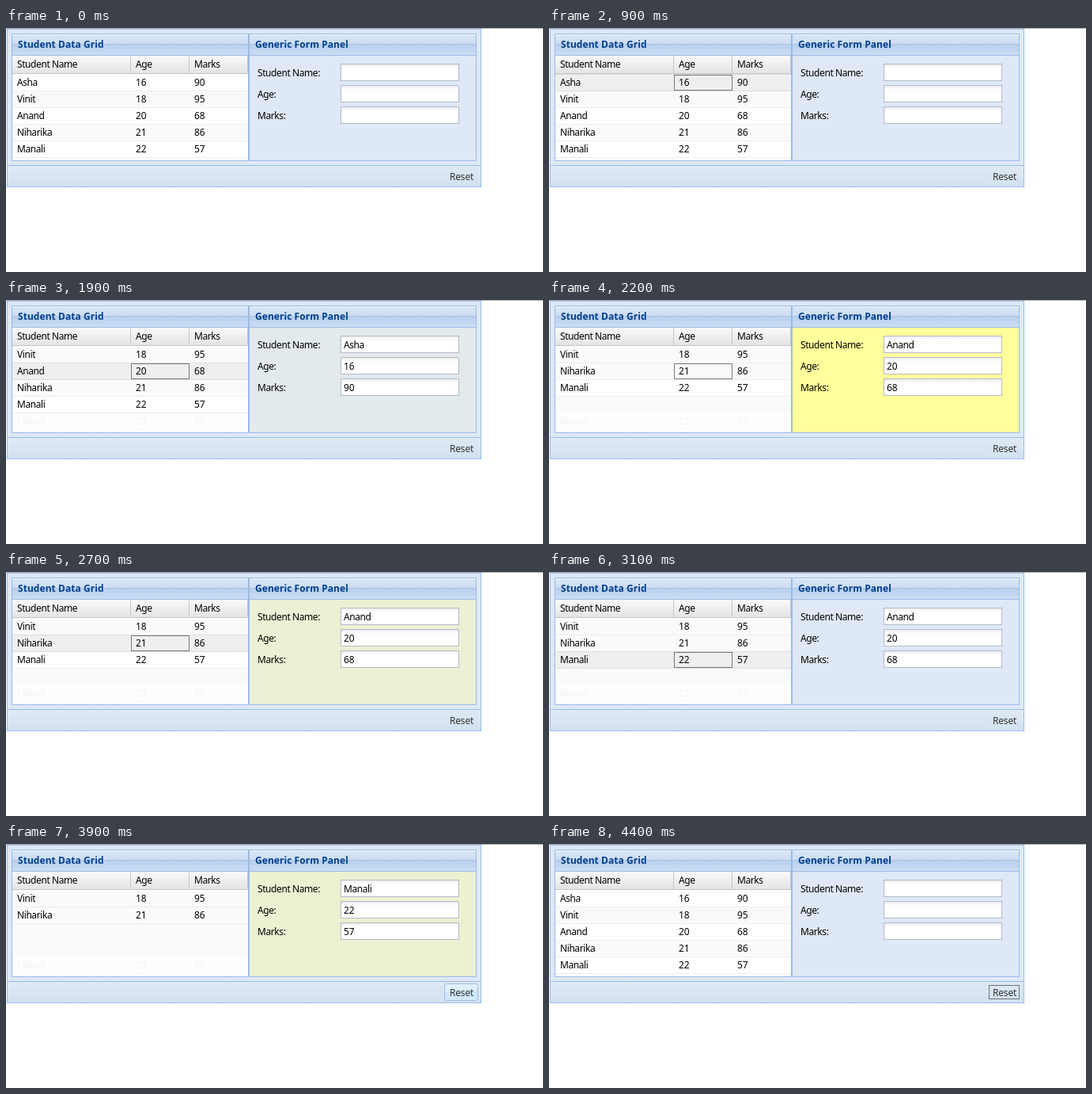
Animation of 679x308 px, one loop 4.9 s. Source, as an HTML page:

```html
<!DOCTYPE html>
<html lang="en">
<head>
<meta charset="utf-8">
<title>Grid to form drag and drop</title>
<style>
html, body { margin: 0; width: 100%; height: 100%; overflow: hidden; background: #fff; }
svg { display: block; width: 679px; height: 308px; }
text { font: 12px "Noto Sans", "Open Sans", sans-serif; letter-spacing: -.42px; fill: #000; white-space: pre; }
text.num { letter-spacing: 0; }
text.title { font-weight: 700; letter-spacing: .05px; fill: #04408c; }
</style>
</head>
<body>
<svg id="stage" viewBox="0 0 679 308" xmlns="http://www.w3.org/2000/svg">
  <defs>
    <linearGradient id="head" x2="0" y2="1">
      <stop stop-color="#dae7f6"/><stop offset=".45" stop-color="#cddef3"/>
      <stop offset=".46" stop-color="#abc7ec"/><stop offset=".5" stop-color="#abc7ec"/>
      <stop offset=".51" stop-color="#b8cfee"/><stop offset="1" stop-color="#cbddf3"/>
    </linearGradient>
    <linearGradient id="cols" x2="0" y2="1">
      <stop stop-color="#f9f9f9"/><stop offset="1" stop-color="#e3e4e6"/>
    </linearGradient>
    <linearGradient id="bar" x2="0" y2="1">
      <stop stop-color="#dfe9f5"/><stop offset="1" stop-color="#d3e1f1"/>
    </linearGradient>
    <linearGradient id="field" x2="0" y2="1">
      <stop stop-color="#ececec"/><stop offset=".25" stop-color="#fff"/>
    </linearGradient>
    <linearGradient id="button" x2="0" y2="1">
      <stop stop-color="#e4f3ff"/><stop offset=".5" stop-color="#d9edff"/>
      <stop offset=".51" stop-color="#c9e6ff"/><stop offset="1" stop-color="#d5ebff"/>
    </linearGradient>
  </defs>
  <g id="base"></g>
  <g id="live"></g>
</svg>
<script>
const LOOP = 4900;
const BORDER = '#99bce8';
const students = [
  ['Asha', 16, 90], ['Vinit', 18, 95], ['Anand', 20, 68], ['Niharika', 21, 86], ['Manali', 22, 57]
];
const columns = [14, 164, 238];
const labels = ['Student Name', 'Age', 'Marks'];

// Each step changes part of the state; fade runs from yellow (0) to the panel colour (1).
const steps = [
  [0, { rows: [0, 1, 2, 3, 4], hover: -1, focus: -1, record: -1, fade: 1, proxy: null, button: 0, used: false }],
  [400, { hover: 1 }],
  [500, { hover: 0 }],
  [900, { focus: 0 }],
  [1000, { proxy: [190, 80] }],
  [1100, { proxy: [262, 92], hover: -1 }],
  [1200, { proxy: [345, 102], fade: 0 }],
  [1300, { proxy: [410, 104], fade: .08 }],
  [1500, { proxy: null, rows: [1, 2, 3, 4], record: 0, fade: .28, hover: 2, used: true }],
  [1700, { fade: .6, hover: 1 }],
  [1800, { fade: .75 }],
  [1900, { fade: .9, focus: 1 }],
  [2000, { fade: 1, proxy: [200, 98] }],
  [2100, { fade: 0, proxy: [299, 104], hover: -1 }],
  [2200, { proxy: null, rows: [1, 3, 4], record: 2 }],
  [2500, { fade: .32 }],
  [2700, { fade: .62, hover: 1 }],
  [2800, { fade: .75, hover: 2 }],
  [2900, { fade: .88 }],
  [3100, { fade: 1, focus: 2 }],
  [3200, { proxy: [220, 110], hover: -1 }],
  [3300, { proxy: [410, 104], fade: 0 }],
  [3400, { proxy: null, rows: [1, 3], focus: -1, record: 4 }],
  [3700, { fade: .35 }],
  [3900, { fade: .6, button: 1 }],
  [4100, { fade: .85, rows: [0, 1, 2, 3, 4], record: -1, button: 2, used: false }],
  [4200, { fade: 1 }],
  [4400, { button: 3 }]
];

const rect = (x, y, w, h, fill, extra = '') =>
  `<rect x="${x}" y="${y}" width="${w}" height="${h}" fill="${fill}" ${extra}/>`;
const frame = (x, y, w, h, fill, stroke, extra = '') =>
  rect(x + .5, y + .5, w - 1, h - 1, fill, `stroke="${stroke}" ${extra}`);
const dotted = (x, y, w, h) => frame(x, y, w, h, 'none', '#000', 'stroke-dasharray="1 1"');
const text = (x, y, value, extra = '') =>
  `<text x="${x}" y="${y}" ${typeof value === 'number' ? 'class="num"' : ''} ${extra}>${value}</text>`;

function panel(x, w, title, body) {
  return frame(x, 7, w, 161, body, BORDER) +
    rect(x + 1, 8, w - 2, 26, 'url(#head)') +
    rect(x + 1, 8, w - 2, 1, '#f0f5fc') +
    rect(x + 1, 34, w - 2, 1, BORDER) +
    text(x + 8, 25, title, 'class="title"');
}

function drawBase() {
  let out = rect(0, 0, 679, 1, '#b0b0b0') +
    frame(1, 1, 600, 200, '#dfe8f6', BORDER) +
    rect(2, 174, 598, 26, 'url(#bar)') + rect(2, 173, 598, 1, BORDER) +
    panel(7, 300, 'Student Data Grid', '#fff') +
    panel(307, 288, 'Generic Form Panel', '#dfe8f6') +
    rect(8, 35, 298, 22, 'url(#cols)') + rect(8, 57, 298, 1, '#c5c5c5');
  [157, 231, 305].forEach((x, i) => {
    out += rect(x, 35, 1, 22, '#c5c5c5') + text(columns[i], 50, labels[i]);
  });
  return out;
}

function drawRow(id, i, hover) {
  const y = 59 + 21 * i;
  const over = i === hover;
  return rect(8, y, 298, 20, over ? '#efefef' : id % 2 ? '#fafafa' : '#fff') +
    (over ? rect(8, y - 1, 298, 1, '#ddd') : '') +
    rect(8, y + 20, 298, 1, over ? '#ddd' : '#ededed') +
    students[id].map((v, c) => text(columns[c], y + 14, v)).join('');
}

function drawGrid(s) {
  let out = '';
  if (s.used) {
    const top = 59 + 21 * s.rows.length;
    if (top < 142) out += rect(8, top, 298, 142 - top, '#f9fbfb');
    out += rect(8, 143, 298, 24, '#fdfdfd') +
      students[4].map((v, c) => text(columns[c], 157, v, 'opacity=".04"')).join('');
  }
  out += s.rows.map((id, i) => drawRow(id, i, s.hover)).join('');
  if (s.focus >= 0) out += dotted(158, 59 + 21 * s.focus, 74, 20);
  return out;
}

function drawForm(s) {
  const mix = (a, b) => Math.round(a + (b - a) * s.fade);
  let out = rect(308, 35, 286, 132, `rgb(${mix(255, 223)},${mix(255, 232)},${mix(156, 246)})`);
  labels.forEach((label, i) => {
    const y = 45 + 27 * i;
    out += text(318, y + 16, label + ':') + frame(423, y, 150, 22, 'url(#field)', '#b5b8c8');
    if (s.record >= 0) out += text(427, y + 16, students[s.record][i]);
  });
  return out;
}

function drawProxy([x, y], ready) {
  return `<g opacity=".85">${frame(x, y, 112, 22, '#fff', '#c4c4c4')}` +
    `<circle cx="${x + 12}" cy="${y + 11}" r="6" fill="${ready ? '#58ab45' : '#d84c3f'}"/>` +
    text(x + 24, y + 15, '1 selected row') + '</g>';
}

function drawReset(mode) {
  return (mode === 1 || mode === 2 ? frame(554, 176, 43, 22, 'url(#button)', '#9ebde0', 'rx="3"') : '') +
    (mode > 1 ? dotted(556, 178, 39, 18) : '') +
    text(561, 192, 'Reset', 'style="fill:#333;letter-spacing:-.2px"');
}

const live = document.getElementById('live');
let shown = -1;

function render(t) {
  let index = 0;
  while (index + 1 < steps.length && steps[index + 1][0] <= t) index++;
  if (index === shown) return;
  shown = index;
  const s = Object.assign({}, ...steps.slice(0, index + 1).map(step => step[1]));
  live.innerHTML = drawGrid(s) + drawForm(s) + drawReset(s.button) +
    (s.proxy ? drawProxy(s.proxy, s.fade < .5) : '');
}

document.getElementById('base').innerHTML = drawBase();
const start = performance.now();
function tick() {
  render((performance.now() - start) % LOOP);
  requestAnimationFrame(tick);
}
tick();
</script>
</body>
</html>
```
